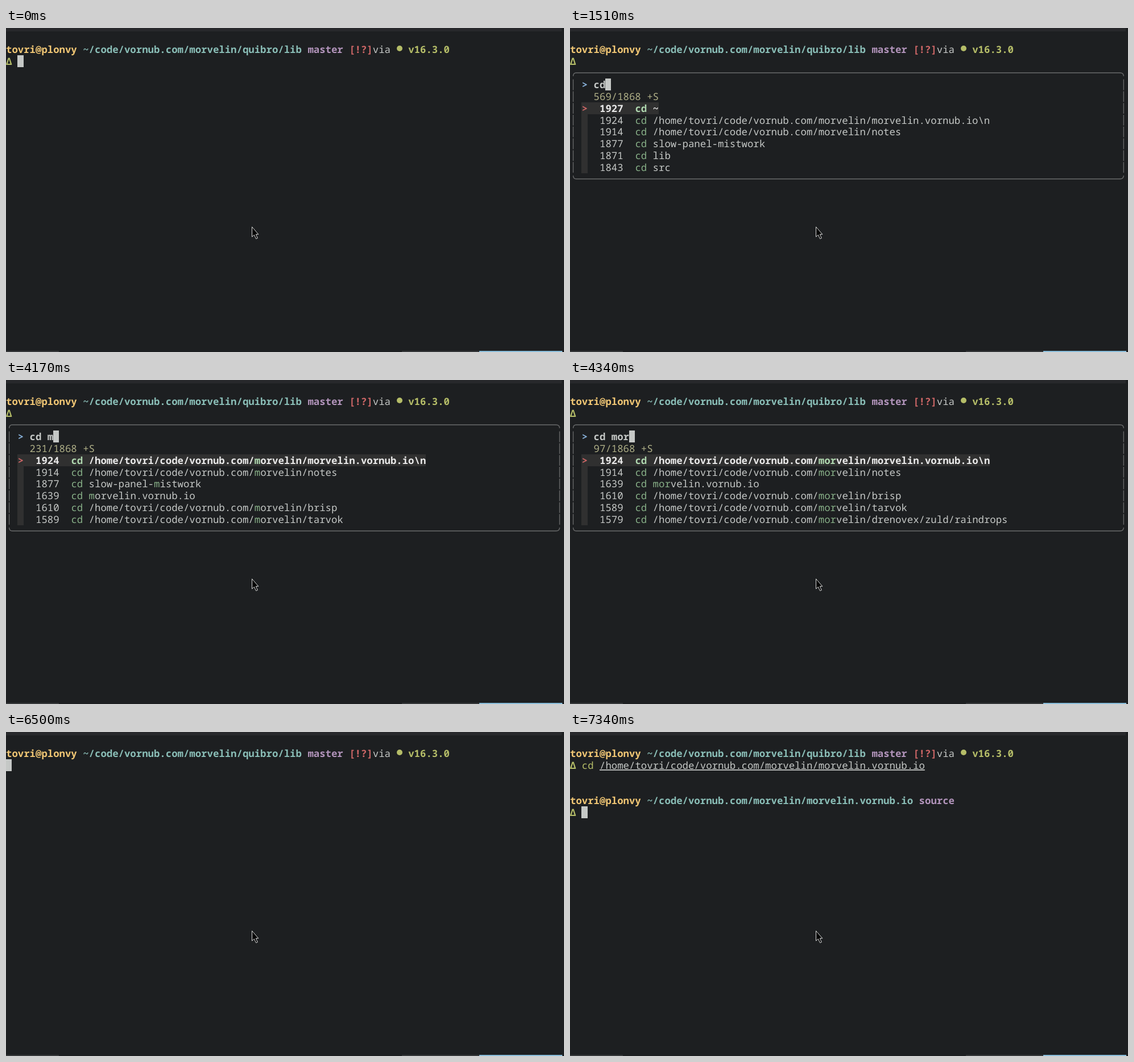
Recreate the animation shown at these times as an HTML page. Size 981x571 px, loop 8000 ms.

```html
<!DOCTYPE html>
<html lang="en">
<head>
<meta charset="utf-8">
<title>Terminal history search</title>
<style>
  html, body { margin: 0; width: 100%; height: 100%; overflow: hidden; background: #1d1f21; }
  svg { display: block; width: 100%; height: 100%; }
  text {
    font: 17.333px "Noto Sans Mono", "DejaVu Sans Mono", monospace;
    font-variant-ligatures: none;
    text-rendering: geometricPrecision;
    white-space: pre;
  }
  .bold { font-weight: 700; }
  .link { text-decoration: underline; text-decoration-thickness: 1px; text-underline-offset: 2px; }
  .border { fill: none; stroke: #6a6b6c; stroke-width: 1.3; }
  .sides { stroke-dasharray: 18.8 2; }
</style>
</head>
<body>
<svg viewBox="0 0 981 571">
  <rect width="977" height="6" fill="#27282b"/>
  <rect y="569" width="93" height="2" fill="#36383a"/>
  <rect x="696" y="569" width="136" height="2" fill="#36383a"/>
  <rect x="832" y="569" width="146" height="2" fill="#8abedb"/>
  <g id="screen"></g>
  <path d="M432.5 350.5V368L436.3 364.6L439.6 371.5L442.3 370.3L439.3 363.6H443.8Z"
        fill="#000" stroke="#dcdcdc" stroke-width="1"/>
</svg>
<script>
const CELL = 10.4, ROW = 20.8, TOP = 27.2, BASELINE = 17, LOOP = 8000;
const color = {
  text: '#c5c8c6', user: '#f0c674', path: '#8abeb7', branch: '#b294bb', red: '#cc6666',
  green: '#b5bd68', prompt: '#87afd7', info: '#afaf87', match: '#87af87',
  bar: '#303030', barText: '#e9e9e9', barMatch: '#afd7af'
};

const user = 'morvelin', host = 'vornub.com', site = user + '.vornub.io';
const home = `/home/tovri/code/${host}/${user}/`;
const go = (id, dir) => [id, 'cd ' + dir];

const entry = {
  root: go(1927, '~'),
  site: go(1924, home + site + '\\n'),
  notes: go(1914, home + 'notes'),
  panel: go(1877, 'slow-panel-mistwork'),
  lib: go(1871, 'lib'),
  src: go(1843, 'src'),
  local: go(1639, site),
  brisp: go(1610, home + 'brisp'),
  tarvok: go(1589, home + 'tarvok'),
  drops: go(1579, home + 'drenovex/zuld/raindrops')
};
const recent = [[1929, 'ls'], [1928, 'clear'], entry.root, [1926, 'ls'], [1925, 'pwd'], entry.site];
const folders = [entry.root, entry.site, entry.notes, entry.panel, entry.lib, entry.src];
const initial = [entry.site, entry.notes, entry.panel, entry.local, entry.brisp, entry.tarvok];
const matches = [entry.site, entry.notes, entry.local, entry.brisp, entry.tarvok, entry.drops];

// Cell edges snap to whole pixels.
const left = col => Math.floor(col * CELL);
const top_ = row => Math.floor(TOP + row * ROW);

function text(col, row, str, fill, style = '') {
  const body = str.trimStart();
  const x = (col + str.length - body.length) * CELL;
  return body && `<text x="${x}" y="${top_(row) + BASELINE}" fill="${fill}" class="${style}">${body}</text>`;
}
const bold = (col, row, str, fill) => text(col, row, str, fill, 'bold');

function block(col, row, cols, rows, fill) {
  const x = left(col), y = top_(row);
  const width = left(col + cols) - x, height = Math.ceil(rows * ROW);
  return `<rect x="${x}" y="${y}" width="${width}" height="${height}" fill="${fill}"/>`;
}
const cursor = (col, row) => block(col, row, 1, 1, color.text);
const delta = row => bold(0, row, 'Δ', color.green);

const place = (row, dir) =>
  bold(0, row, 'tovri@plonvy', color.user) + bold(13, row, `~/code/${host}/${user}/${dir}`, color.path);

const header = place(0, 'quibro/lib')
  + bold(51, 0, 'master', color.branch)
  + bold(58, 0, '[!?]', color.red)
  + text(62, 0, 'via', color.text)
  + `<circle cx="692" cy="36" r="5" fill="${color.green}"/>`
  + bold(68, 0, 'v16.3.0', color.green);

const frame = `<path class="border" d="M5.6 85Q5.6 79 11 79H967Q973.3 79 973.3 85
    M5.6 260Q5.6 266 11 266H967Q973.3 266 973.3 260"/>
  <path class="border sides" d="M5.6 90.6V255.5M973.3 90.6V255.5"/>`;

function resultRow([id, command], index, terms) {
  const row = 5 + index, style = index ? '' : 'bold';
  const plain = index ? color.text : color.barText;
  const lit = index ? color.match : color.barMatch;
  let out = text(5, row, String(id), plain, style), at = 0;
  for (const term of terms) {
    const start = command.search(new RegExp('\\b' + term));
    out += text(11 + at, row, command.slice(at, start), plain, style)
      + text(11 + start, row, term, lit, style);
    at = start + term.length;
  }
  return out + text(11 + at, row, command.slice(at), plain, style);
}

function finder(query, count, rows) {
  const terms = query.split(' ').filter(Boolean);
  return delta(1) + frame
    + bold(2, 3, '>', color.prompt) + bold(4, 3, query, color.text) + cursor(4 + query.length, 3)
    + text(4, 4, count + '/1868 +S', color.info)
    + block(2, 5, 1, 6, color.bar) + block(2, 5, 9 + rows[0][1].length, 1, color.bar)
    + bold(2, 5, '>', color.red)
    + rows.map((item, i) => resultRow(item, i, terms)).join('');
}
const typed = (length, count, rows = matches) => finder('cd ' + user.slice(0, length), count, rows);

const command = delta(1) + text(2, 1, 'cd', color.green) + text(5, 1, home + site, color.text, 'link');

const scenes = [
  [0, delta(1) + cursor(2, 1)],
  [500, finder('', 1868, recent)],
  [1510, finder('cd', 569, folders)],
  [3840, typed(0, 569, folders)],
  [4170, typed(1, 231, initial)],
  [4340, typed(3, 97)],
  [4490, typed(4, 78)],
  [4660, typed(6, 65)],
  [4810, typed(7, 64)],
  [5010, typed(8, 63)],
  [6500, cursor(0, 1)],
  [6660, command + cursor(0, 2)],
  [7340, command + place(4, site) + bold(59, 4, 'source', color.branch) + delta(5) + cursor(2, 5)]
];

const terminal = document.getElementById('screen');
const begin = performance.now();
let shown;
function draw() {
  const time = (performance.now() - begin) % LOOP;
  const scene = scenes.findLast(([start]) => start <= time);
  if (scene !== shown) {
    shown = scene;
    terminal.innerHTML = header + scene[1];
  }
  requestAnimationFrame(draw);
}
draw();
</script>
</body>
</html>
```
